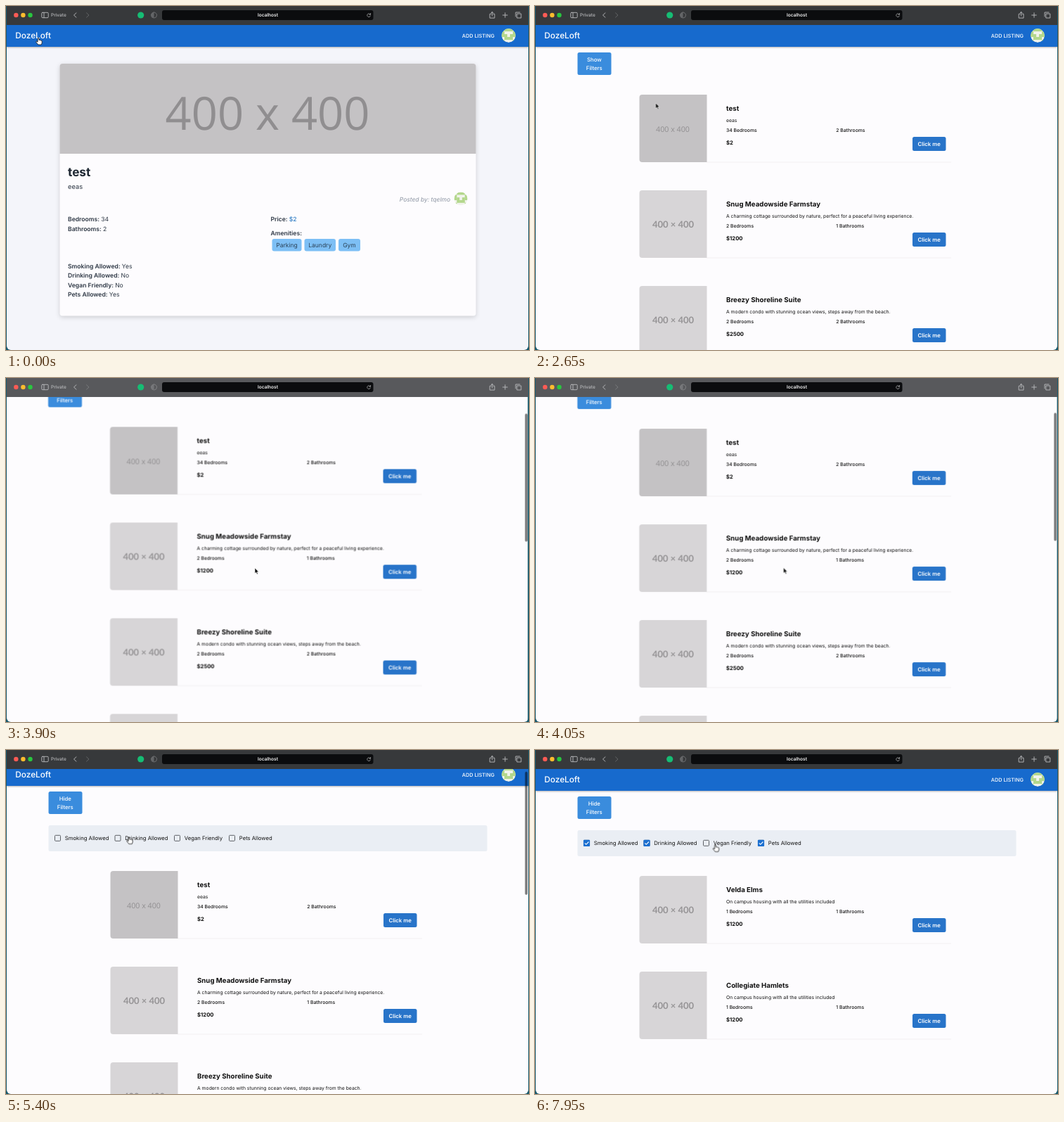
Animation of 744 by 489 pixels, one loop 8000 ms. Source, as an HTML page:

```html
<!DOCTYPE html>
<html lang="en">
<head>
<meta charset="utf-8">
<title>Listings demo</title>
<style>
html, body { margin: 0; width: 100%; height: 100%; overflow: hidden; background: #17586b; }
svg { display: block; width: 744px; height: 489px; }
text { font-family: Inter, "Open Sans", sans-serif; text-rendering: geometricPrecision; white-space: pre; }
.sans { font-family: "Open Sans", "Noto Sans", sans-serif; }
.lato { font-family: Lato, sans-serif; }
.mid { text-anchor: middle; }
.end { text-anchor: end; }
.italic { font-style: italic; }
.soft { filter: blur(.6px); }
.header { filter: drop-shadow(0 1.5px 1.2px rgba(0, 0, 0, .3)); }
.panel { filter: drop-shadow(0 2px 3px rgba(0, 0, 0, .16)); }
.line { fill: none; stroke: #bcbdbf; stroke-width: .9; stroke-linecap: round; stroke-linejoin: round; }
</style>
</head>
<body>
<script>
const LOOP = 8000;
const OPEN = 4950, DRINK = 5700, PETS = 6250, SMOKE = 6750;
const rules = [];

// Turns [ms, value] pairs into a looping keyframe animation.
function track(id, prop, stops, timing = 'linear') {
  const all = [...stops];
  if (all[0][0] > 0) all.unshift([0, all[0][1]]);
  all.push([LOOP, all[all.length - 1][1]]);
  const frames = all.map(([ms, v]) => `${ms / LOOP * 100}% { ${prop}: ${v} }`).join(' ');
  rules.push(`@keyframes ${id} { ${frames} } #${id} { animation: ${id} ${LOOP}ms ${timing} infinite }`);
}
const steps = (id, prop, stops) => track(id, prop, stops, 'step-end');

function during(id, from, to, body) {
  const stops = [[0, from ? 0 : 1]];
  if (from) stops.push([from, 1]);
  if (to < LOOP) stops.push([to, 0]);
  steps(id, 'opacity', stops);
  return group(id, body);
}

const group = (id, body) => `<g id="${id}">${body}</g>`;
const at = (x, y, body) => `<g transform="translate(${x} ${y})">${body}</g>`;
const rect = (x, y, w, h, fill, r = 0, cls = '') =>
  `<rect x="${x}" y="${y}" width="${w}" height="${h}" rx="${r}" fill="${fill}" class="${cls}"/>`;
const dot = (x, y, r, fill) => `<circle cx="${x}" cy="${y}" r="${r}" fill="${fill}"/>`;
const line = (d, extra = '') => `<path class="line" d="${d}" ${extra}/>`;
const text = (x, y, size, weight, str, fill = '#111', cls = '') =>
  `<text x="${x}" y="${y}" font-size="${size}" font-weight="${weight}" fill="${fill}" class="${cls}">${str}</text>`;

function avatar(x, y, r) {
  const rows = ['.###.', '#...#', '##.##', '.###.', '#...#'];
  const cells = rows.map((row, j) => [...row].map((c, i) =>
    c === '#' ? rect(i * 4 - 10, j * 4 - 10, 4.1, 4.1, '#b3d78c') : '').join('')).join('');
  return `<g transform="translate(${x} ${y}) scale(${r / 10})" clip-path="url(#disc)">
    ${dot(0, 0, 10, '#f1f3ec')}${cells}</g>`;
}

function detailPage() {
  const ink = '#2d3744';
  const fact = (x, y, label, value) =>
    text(x, y, 8.6, 600, `${label}: <tspan font-weight="400">${value}</tspan>`, ink);
  const chip = (x, w, label) =>
    rect(x, 331, w, 17.5, '#7dbff5', 3) + text(x + w / 2, 343, 8.5, 400, label, '#2b4258', 'mid');
  const policies = [['Smoking Allowed', 'Yes'], ['Drinking Allowed', 'No'], ['Vegan Friendly', 'No'], ['Pets Allowed', 'Yes']];
  return rect(1, 27, 742, 470, '#f4f5fa') +
    rect(76.5, 82, 592, 358.5, '#fdfcfe', 4, 'panel') +
    `<path d="M76.5 210V86a4 4 0 0 1 4-4h584a4 4 0 0 1 4 4v124z" fill="#c4c2c4"/>` +
    text(372, 176, 65, 500, '400 x 400', '#908e90', 'sans mid soft') +
    text(88, 242, 17.2, 700, 'test', '#1f2833') +
    text(88, 260, 9.3, 400, 'eeas', ink) +
    text(632, 277.5, 8.5, 400, 'Posted by: tqelmo', '#8a93a1', 'italic end') +
    avatar(647, 274, 9.5) +
    fact(88, 306, 'Bedrooms', 34) + fact(88, 319.5, 'Bathrooms', 2) +
    fact(376.5, 306, 'Price', '<tspan font-weight="500" fill="#2f7cc4">$2</tspan>') +
    text(376.5, 325.5, 8.6, 600, 'Amenities:', ink) +
    chip(378.5, 42, 'Parking') + chip(424.5, 44.5, 'Laundry') + chip(473, 31, 'Gym') +
    policies.map(([k, v], i) => fact(88, 372.7 + i * 13.5, k, v)).join('');
}

const campus = 'On campus housing with all the utilities included';
const listings = {
  test: ['test', 'eeas', 34, 2, 2],
  farm: ['Snug Meadowside Farmstay', 'A charming cottage surrounded by nature, perfect for a peaceful living experience.', 2, 1, 1200],
  shore: ['Breezy Shoreline Suite', 'A modern condo with stunning ocean views, steps away from the beach.', 2, 2, 2500],
  elms: ['Velda Elms', campus, 1, 1, 1200],
  hamlet: ['Collegiate Hamlets', campus, 1, 1, 1200],
};

function card(key, i) {
  const [title, about, beds, baths, price] = listings[key];
  const first = key === 'test';
  return at(0, 126 + i * 136,
    rect(244, 95.6, 348, .8, '#f0eef1') +
    `<path d="M244.5 0V96H152.5a4 4 0 0 1-4-4V4a4 4 0 0 1 4-4z" fill="${first ? '#c4c2c4' : '#d7d5d7'}"/>` +
    (first ? text(196, 52.8, 10.7, 400, '400 x 400', '#918f91', 'sans mid')
           : text(196.5, 52.8, 13, 700, '400 × 400', '#969496', 'lato mid')) +
    text(272, 23.2, 9.7, 700, title) +
    text(272, 38.8, 6.8, 400, about) +
    text(272, 53.4, 6.8, 500, `${beds} Bedrooms`) +
    text(428.3, 53.4, 6.8, 500, `${baths} Bathrooms`) +
    text(272, 71, 7.7, 700, `$${price}`) +
    rect(537, 60, 47.5, 20, '#2874c9', 2.5) +
    text(560.7, 73, 7.8, 600, 'Click me', '#fff', 'mid'));
}
const cards = (...keys) => keys.map(card).join('');

function filters() {
  const box = (x, label, id, when) =>
    `<rect x="${x - 4}" y="128.3" width="8" height="8" rx="1" fill="none" stroke="#5d6065"/>` +
    (when ? during(id, when, LOOP, rect(x - 4.6, 127.7, 9.2, 9.2, '#1b6fd0', 1) +
      `<path d="M${x - 2.7} 132.4l1.9 1.9 3.7-3.8" fill="none" stroke="#fff" stroke-width="1.1"/>`) : '') +
    text(x + 10.3, 135, 7.7, 400, label);
  return rect(60.5, 114, 624, 37, '#eaeef4', 2.5) +
    box(73.5, 'Smoking Allowed', 'smoking', SMOKE) +
    box(159, 'Drinking Allowed', 'drinking', DRINK) +
    box(243.5, 'Vegan Friendly') +
    box(321.5, 'Pets Allowed', 'pets', PETS);
}

function listPage() {
  const word = (id, from, to, str) => during(id, from, to, text(84.3, 79, 7.8, 500, str, '#fff', 'mid'));
  steps('list', 'transform', [[0, 'translateY(0)'], [OPEN, 'translateY(53px)']]);
  return rect(1, 27, 742, 600, '#fdfcfe') +
    rect(60.5, 66, 48, 32, '#3a8cdd', 2.5) +
    word('show', 0, OPEN, 'Show') + word('hide', OPEN, LOOP, 'Hide') +
    text(84.3, 91, 7.8, 500, 'Filters', '#fff', 'mid') +
    during('filters', OPEN, LOOP, filters()) +
    group('list',
      during('all', 150, DRINK, cards('test', 'farm', 'shore', 'elms', 'hamlet')) +
      during('drinkers', DRINK, PETS, cards('farm', 'shore', 'elms', 'hamlet')) +
      during('owners', PETS, SMOKE, cards('shore', 'elms', 'hamlet')) +
      during('matches', SMOKE, LOOP, cards('elms', 'hamlet')));
}

const header = () => rect(1, 27, 742, 31, '#176acd', 0, 'header') +
  text(13.3, 46.2, 11.8, 500, 'DozeLoft', '#fff') +
  text(695, 44.7, 7.3, 500, 'ADD LISTING', '#fff', 'end') +
  avatar(715, 42, 10);

function toolbar() {
  steps('bar', 'fill', [[0, '#37393b'], [3750, '#58595c'], [4200, '#37393b']]);
  return `<path id="bar" d="M1 27V0h742v27z" fill="#37393b"/>` +
    dot(14.3, 13, 3.2, '#fc5b55') + dot(24.4, 13, 3.2, '#fdbc2e') + dot(34.5, 13, 3.2, '#29c73f') +
    line('M52 9.3h7a1.2 1.2 0 0 1 1.2 1.2v5a1.2 1.2 0 0 1-1.2 1.2h-7a1.2 1.2 0 0 1-1.2-1.2v-5a1.2 1.2 0 0 1 1.2-1.2zM54 9.5v7') +
    text(64, 15.4, 6.5, 500, 'Private', '#b9babc') +
    line('M100 9.8L96.5 13l3.5 3.2') + line('M114.5 9.8L118 13l-3.5 3.2', 'opacity=".35"') +
    dot(191.7, 13, 4.6, '#16bd74') +
    `<g opacity=".45">${line('M210.5 9a4 4 0 1 0 0 8a4 4 0 0 0 0-8')}<path d="M210.5 9a4 4 0 0 0 0 8z" fill="#9a9b9d"/></g>` +
    rect(222, 6, 300.5, 14, '#0b0c0e', 3) +
    text(372.5, 15.4, 6.6, 600, 'localhost', '#f2f2f2', 'mid') +
    line('M518.3 12a2.4 2.4 0 1 0 .2 2M518.6 10.4v1.8h-1.8', 'style="stroke-width:.7"') +
    line('M690 11.3h-1.8v5.8h6.8v-5.8h-1.8M691.6 14V8.4M689.9 10l1.7-1.7 1.7 1.7') +
    line('M706.7 13h6.6M710 9.7v6.6') +
    line('M727.2 11h5.6v6h-5.6zM725 15V9h6');
}

function scrollArea() {
  const scroll = [[3550, 0], [3600, 2.5], [3700, 20], [3800, 42], [3900, 56.5], [4000, 60],
    [4100, 48], [4250, 20], [4400, 7], [SMOKE - 1, 7], [SMOKE, 0]];
  track('page', 'transform', scroll.map(([ms, s]) => [ms, `translate(${s > 50 ? -.5 : 0}px, ${-s}px)`]));
  track('thumb', 'transform', scroll.map(([ms, s]) => [ms, `translateY(${s * .4}px)`]));
  const thumb = h => rect(738.3, 28, 3.6, h, 'rgba(0, 0, 0, .5)', 1.8);
  return group('page',
      during('listing', 100, LOOP, listPage()) + during('detail', 0, 100, detailPage()) + header()) +
    group('thumb', during('long', 3550, OPEN, thumb(182)) + during('short', OPEN, 5850, thumb(175)));
}

function cursor() {
  const path = [[0, 46, 45], [850, 46, 45], [1000, 62, 58], [1150, 82, 68], [1300, 82, 68],
    [1450, 83.5, 67.5], [1600, 94, 76], [1750, 80, 84], [1900, 66, 76], [2050, 80, 69], [2200, 66, 78],
    [2450, 96, 88], [2700, 190, 150], [2950, 290, 222], [3200, 338, 258], [3450, 354, 270], [4050, 354, 270],
    [4250, 250, 190], [4500, 118, 84], [4650, 90, 74], [5100, 88, 76], [5250, 130, 104], [5400, 175, 123.5],
    [5600, 182, 122], [5800, 182, 122], [6100, 346, 124], [6350, 346, 124], [6600, 120, 129],
    [7250, 121, 129], [7500, 178, 132], [7750, 240, 134], [7950, 256.5, 134.5]];
  track('cursor', 'transform', path.map(([ms, x, y]) => [ms, `translate(${x}px, ${y}px)`]));
  // Times at which the pointer toggles between hand and arrow.
  const toggles = [900, 1100, 2400, 4600, 5180, 5350];
  const shape = (id, shown) =>
    steps(id, 'opacity', [0, ...toggles].map((ms, i) => [ms, (i % 2 === 0) === shown ? 1 : 0]));
  shape('hand', true);
  shape('arrow', false);
  return group('cursor',
    group('hand', `<path d="M-.9 .8Q0-.5 .9 .8V3.4Q2.2 2.8 2.5 3.8 3.6 3.2 3.9 4.3 5.2 3.9 5.2 5.3V7Q5 8.7 4.2 10H-.2Q-1.4 8.6-3.2 6.3-3.4 4.8-2.1 5.2L-.9 6.2z" fill="#fff" stroke="#111" stroke-width=".8" stroke-linejoin="round"/>`) +
    group('arrow', `<path d="M0 0V7.8L1.8 6.2 3 9 4.4 8.4 3.2 5.7H5.5z" fill="#111" stroke="#fff" stroke-width=".6"/>`));
}

const art = `<svg viewBox="0 0 744 489">
  <defs>
    <clipPath id="disc"><circle r="10"/></clipPath>
    <clipPath id="window"><path d="M1 0H743V483a6 6 0 0 1-6 6H7a6 6 0 0 1-6-6z"/></clipPath>
  </defs>
  ${rect(0, 0, 744, 489, '#17586b')}
  <g clip-path="url(#window)">${scrollArea()}${toolbar()}</g>
  ${cursor()}
</svg>`;
const style = document.createElement('style');
style.textContent = rules.join('\n');
document.head.append(style);
document.body.innerHTML = art;
</script>
</body>
</html>
```
